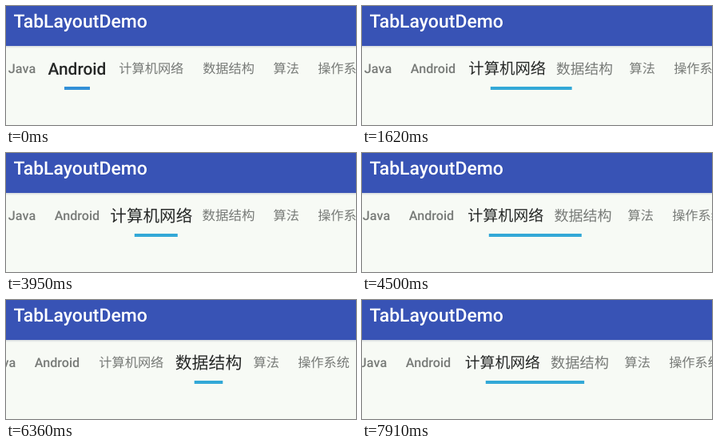
An HTML page for the animation above (7990 ms loop, 438 by 149 pixels).

```html
<!DOCTYPE html>
<html lang="zh-CN">
<head>
<meta charset="utf-8">
<title>TabLayoutDemo</title>
<style>
  html, body { margin: 0; width: 100%; height: 100%; overflow: hidden; background: #f7faf5; }
  svg { display: block; width: 438px; height: 149px; }
  text { font-family: Roboto, "Noto Sans CJK SC", "Noto Sans CJK", sans-serif; text-rendering: geometricPrecision; }
  .title { font-size: 23px; font-weight: 500; fill: #fff; }
  .tab { font-size: 16.2px; text-anchor: middle; }
  .latin { font-weight: 500; }
</style>
</head>
<body>
<svg viewBox="0 0 438 149">
  <defs>
    <linearGradient id="shade" x2="0" y2="1">
      <stop offset="0" stop-color="#8a94a8" stop-opacity=".32"/>
      <stop offset="1" stop-color="#8a94a8" stop-opacity="0"/>
    </linearGradient>
  </defs>
  <rect width="438" height="149" fill="#f7faf5"/>
  <rect y="50" width="438" height="3" fill="url(#shade)"/>
  <rect width="438" height="50" fill="#3853b5"/>
  <text class="title" x="9.6" y="27">TabLayoutDemo</text>
  <g id="strip"><rect id="bar" y="101" height="4"/></g>
</svg>
<script>
const LOOP = 7990, VIEW = 436, MAX_SCROLL = 25, GROW = 0.29;

// label, centre, tab width
const tabs = [
  ['Java', 20, 58], ['Android', 89, 80], ['计算机网络', 181.8, 105],
  ['数据结构', 278.5, 89], ['算法', 350.7, 56], ['操作系统', 422.5, 89]
].map(([label, x, w]) => ({ label, x, w }));

const linear = u => u;
const smooth = u => u * u * (3 - 2 * u);
const easeOut = k => u => 1 - (1 - u) ** k;

// swipes: start ms, end ms, steps, page from, page to, easing
const swipes = [
  [70, 1100, 14, 1.02, 2, smooth],
  [1620, 1850, 4, 2.32, 3, easeOut(2)],
  [2560, 2940, 6, 2.736, 2, easeOut(2)],
  [3950, 6360, 32, 2.064, 3, easeOut(1.71)],
  [6820, 7910, 15, 2.97, 2.435, linear]
];

const strip = document.getElementById('strip');
const bar = document.getElementById('bar');
const clamp = (v, lo, hi) => Math.min(hi, Math.max(lo, v));
const lerp = (a, b, u) => a + (b - a) * u;

for (const tab of tabs) {
  const el = document.createElementNS('http://www.w3.org/2000/svg', 'text');
  el.textContent = tab.label;
  el.setAttribute('class', /^\w/.test(tab.label) ? 'tab latin' : 'tab');
  el.setAttribute('y', 5.9);
  strip.append(el);
  tab.el = el;
}

function pageAt(t) {
  let page = 1;
  for (const [start, end, steps, from, to, ease] of swipes) {
    if (t < start) break;
    const n = steps - 1;
    const u = Math.floor((t - start) / (end - start) * n + 1e-6) / n;
    page = lerp(from, to, ease(Math.min(1, u)));
  }
  return page;
}

function draw(t) {
  const page = pageAt(t);
  const i = Math.floor(page), p = page - i;
  const a = tabs[i], b = tabs[i + 1];

  const scroll = clamp(lerp(a.x, b.x, p) - VIEW / 2, 0, MAX_SCROLL);
  strip.setAttribute('transform', `translate(${-Math.round(scroll)} 0)`);

  tabs.forEach(({ el, x }, k) => {
    const near = Math.max(0, 1 - Math.abs(page - k));
    el.setAttribute('transform', `translate(${x} 78.2) scale(${1 + GROW * near})`);
    el.setAttribute('fill', near > 0.5 ? '#252726' : '#777a77');
  });

  // the leading edge moves in the first half, the trailing edge in the second
  const left = lerp(a.x - a.w * 0.2, b.x - b.w * 0.2, clamp(2 * p - 1, 0, 1));
  const right = lerp(a.x + a.w * 0.2, b.x + b.w * 0.2, clamp(2 * p, 0, 1));
  bar.setAttribute('x', left);
  bar.setAttribute('width', right - left);
  bar.setAttribute('fill', `hsl(${lerp(206, 197, clamp(page - 1, 0, 1))} 67% 52%)`);
}

const begin = performance.now();
function frame() {
  draw((performance.now() - begin) % LOOP);
  requestAnimationFrame(frame);
}
frame();
</script>
</body>
</html>
```
